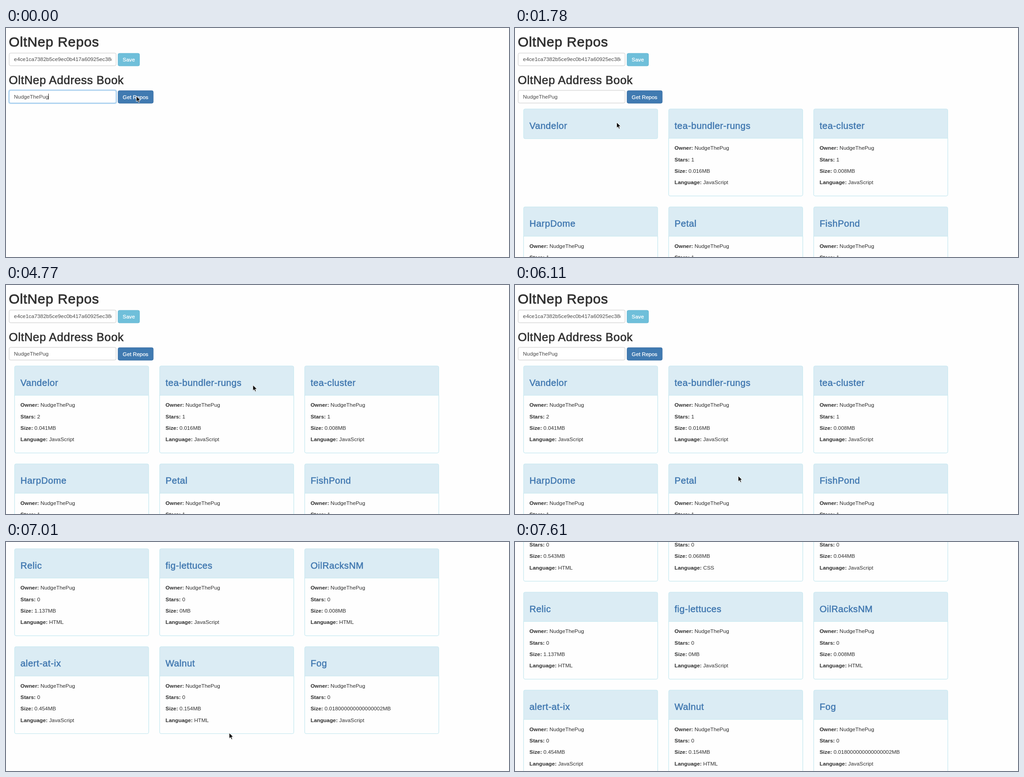
These frames come from a looping animation (1106x506 px, 8360 ms). An HTML page:

```html
<!DOCTYPE html>
<html lang="en">
<head>
<meta charset="utf-8">
<title>Repository list</title>
<style>
  html, body { margin: 0; width: 100%; height: 100%; overflow: hidden; background: #fefefe; }
  svg { display: block; width: 1106px; height: 506px; }
  text { font: 11.8px "Liberation Sans", Arial, sans-serif; fill: #2e2e2e; white-space: pre; }
  .b { font-weight: bold; }
  .h { letter-spacing: .023em; fill: #303030; stroke: #303030; stroke-width: .027em; }
  .h1 { font-size: 30.3px; }
  .h2 { font-size: 25.3px; }
  .h3 { font-size: 20.2px; fill: #4178b0; stroke: #4178b0; }
  .in { fill: #484848; }
  .btn { fill: #fff; stroke: #fff; stroke-width: .3px; }
  .card { stroke: #bfe6ef; stroke-width: .9px; }
</style>
</head>
<body>
<svg id="stage" viewBox="0 0 1106 506"></svg>
<script>
const LOOP = 8360, STEP = 149;
const OWNER = "NudgeThePug";
const ROW_Y = 178.9, ROW_GAP = 216.4, CARD_W = 294.8, HEAD_H = 65.2, CARD_H = 192.1;
const COLS = [18.9, 337.9, 656.8];

// name, stars, size, language
const REPOS = [
  ["Vandelor", 2, "0.041", "JavaScript"],
  ["tea-bundler-rungs", 1, "0.016", "JavaScript"],
  ["tea-cluster", 1, "0.008", "JavaScript"],
  ["HarpDome", 1, "0.124", "JavaScript"],
  ["Petal", 1, "0.032", "JavaScript"],
  ["FishPond", 1, "0.287", "JavaScript"],
  ["Acorn", 0, "0.543", "HTML"],
  ["basket-demo", 0, "0.068", "CSS"],
  ["Canopy", 0, "0.044", "JavaScript"],
  ["Relic", 0, "1.137", "HTML"],
  ["fig-lettuces", 0, "0", "JavaScript"],
  ["OilRacksNM", 0, "0.008", "HTML"],
  ["alert-at-ix", 0, "0.454", "JavaScript"],
  ["Walnut", 0, "0.154", "HTML"],
  ["Fog", 0, "0.018000000000000002", "JavaScript"]
];

// card index, closed from, open again
const CLOSED = [[0, 1780, 2380], [1, 3420, 4170], [4, 5510, 6110]];

// start, steps, from, bend, to
const MOVES = [
  [1180, 4, [286.6, 150.6], [250, 172], [223.6, 208.6]],
  [2670, 4, [223.6, 208.6], [385, 88], [546.6, 198]],
  [4770, 5, [546.6, 198], [530, 310], [490.8, 422]],
  [7160, 2, [490.8, 422], [700, 416], [905.8, 395]]
];

const stage = document.getElementById("stage");

function add(parent, tag, attrs, content) {
  const node = document.createElementNS("http://www.w3.org/2000/svg", tag);
  for (const key in attrs) node.setAttribute(key, attrs[key]);
  if (content !== undefined) node.textContent = content;
  parent.appendChild(node);
  return node;
}

function label(parent, x, y, content, cls) {
  return add(parent, "text", { x, y, class: cls || "" }, content);
}

function box(parent, x, y, width, height, fill, stroke, more) {
  return add(parent, "rect", { x, y, width, height, rx: 3.2, fill, stroke, ...more });
}

function show(node, on) {
  node.style.display = on ? "" : "none";
}

const page = add(stage, "g", {});

label(page, 6.2, 41.2, "OltNep Repos", "h h1");
label(page, 6.2, 123.8, "OltNep Address Book", "h h2");

const clip = add(add(stage, "defs", {}), "clipPath", { id: "field" });
add(clip, "rect", { x: 17, y: 56, width: 215.4, height: 27 });

box(page, 7, 55.4, 235, 28, "#fff", "#c9c9c9");
const token = add(page, "g", { "clip-path": "url(#field)" });
label(token, 17.6, 73.4, "e4ce1ca7382b5ce9ec0b417a60925ec38d7", "in");
box(page, 246.4, 56, 47.2, 27.8, "#6fbfda", "#60b5d2");
label(page, 256.6, 74.2, "Save", "btn");

const glow = box(page, 5.9, 136.7, 237.2, 30.2, "none", "#c8e1f5", { "stroke-width": 2 });
const field = box(page, 7, 137.8, 235, 28, "#fff", "#c9c9c9");
label(page, 17.6, 155.8, OWNER, "in");
const caret = add(page, "rect", { x: 93, y: 145, width: 1, height: 13, fill: "#333" });

const ring = box(page, 245, 137, 80.4, 30.6, "none", "#9cc3ee", { "stroke-width": 3 });
const button = box(page, 246.4, 138.4, 77.4, 27.8, "#407ab1", "#386da1");
label(page, 256.6, 156.6, "Get Repos", "btn");

function makeCard([name, stars, size, language], i) {
  const g = add(list, "g", {
    transform: `translate(${COLS[i % 3]} ${ROW_Y + Math.floor(i / 3) * ROW_GAP})`
  });
  const frame = box(g, 0, 0, CARD_W, CARD_H, "#dbecf4", "#bfe6ef", { class: "card" });
  label(g, 12.9, 44.2, name, "h h3");

  const body = add(g, "g", {});
  const r = 3.2, w = CARD_W, h = CARD_H;
  add(body, "path", {
    class: "card", fill: "#fefefe",
    d: `M0 ${HEAD_H - .4}H${w}V${h - r}Q${w} ${h} ${w - r} ${h}H${r}Q0 ${h} 0 ${h - r}Z`
  });
  const lines = [["Owner:", OWNER], ["Stars:", stars], ["Size:", size + "MB"], ["Language:", language]];
  lines.forEach(([key, value], n) => {
    const line = label(body, 12.9, 90.4 + n * 25.28);
    add(line, "tspan", { class: "b" }, key);
    add(line, "tspan", {}, " " + value);
  });
  return { frame, body };
}

const list = add(page, "g", {});
const cards = REPOS.map(makeCard);

const cursor = add(stage, "g", {});
const arrow = "M0 0V12.2L2.9 9.6L4.9 14.2L7 13.3L5.1 8.8H9Z";
add(cursor, "path", { d: arrow, fill: "#000", opacity: .16, transform: "translate(.4 1.2)" });
add(cursor, "path", { d: arrow, fill: "#000", stroke: "#fff", "stroke-width": 1 });

function cursorAt(t) {
  let pos = MOVES[0][2];
  for (const [start, steps, from, bend, to] of MOVES) {
    if (t < start) break;
    const k = Math.min(1, (Math.floor((t - start) / STEP) + 1) / steps);
    const u = k * k * (3 - 2 * k), v = 1 - u;
    pos = from.map((p, i) => v * v * p + 2 * v * u * bend[i] + u * u * to[i]);
  }
  return pos;
}

// A flick past the end of the page, then the spring back.
function scrollAt(t) {
  if (t < 6860) return 0;
  if (t < 7010) return 460;
  if (t >= 7610) return 717.2;
  return 717.2 + 96 * Math.pow(.306, Math.floor((t - 7010) / 150));
}

function draw(t) {
  const typing = t < 590, pressed = t >= 590 && t < 1780;
  show(glow, typing);
  show(caret, t < 150);
  field.setAttribute("stroke", typing ? "#74b3e4" : "#c9c9c9");
  show(ring, pressed);
  button.setAttribute("fill", pressed ? "#35648f" : "#407ab1");

  show(list, t >= 890);
  for (const [i, from, to] of CLOSED) {
    const shut = t >= from && t < to;
    show(cards[i].body, !shut);
    cards[i].frame.setAttribute("height", shut ? HEAD_H + .5 : CARD_H);
  }

  page.setAttribute("transform", `translate(0 ${-scrollAt(t)})`);
  show(cursor, t < 7460);
  cursor.setAttribute("transform", `translate(${cursorAt(t).join(" ")})`);
}

function tick() {
  draw(performance.now() % LOOP);
  requestAnimationFrame(tick);
}
tick();
</script>
</body>
</html>
```
